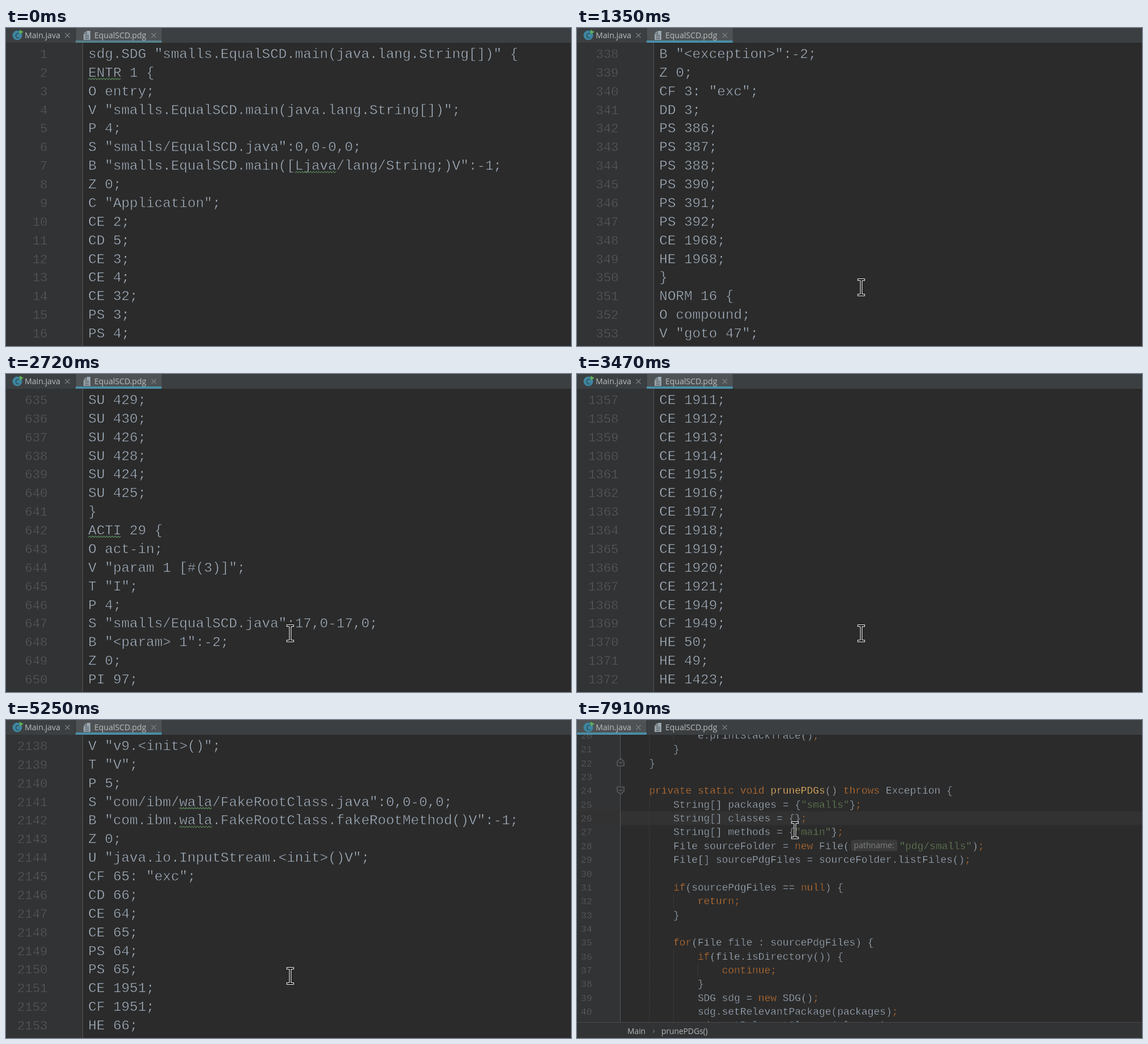
Animation, 998 px wide and 561 px high, one loop 8000 ms. Source, as an HTML page with a canvas:

```html
<!DOCTYPE html>
<html lang="en">
<head>
<meta charset="utf-8">
<title>Editor scrolling</title>
<style>
html, body { margin: 0; width: 100%; height: 100%; overflow: hidden; background: #2b2b2b; }
canvas { display: block; width: 998px; height: 561px; }
</style>
</head>
<body>
<canvas id="stage" width="998" height="561"></canvas>
<script>
const g = document.getElementById('stage').getContext('2d');
const MONO = '"Liberation Mono", "Courier New", monospace';
const UI = '"Open Sans", "Noto Sans", sans-serif';
const PAPER = '#2b2b2b', GUTTER = '#313335';
const LOOP = 8000, SWITCH = 7290, CLICK = 550;

// ---- Graph file: known passages, the rest follows simple block rules
const MAIN = 'smalls.EqualSCD.main([Ljava/lang/String;)V';
const ROOT = `P 5;
S "com/ibm/wala/FakeRootClass.java":0,0-0,0;
B "com.ibm.wala.FakeRootClass.fakeRootMethod()V":-1;
Z 0;`;
const passages = {
  1: `sdg.SDG "smalls.EqualSCD.main(java.lang.String[])" {
ENTR 1 {
O entry;
V "smalls.EqualSCD.main(java.lang.String[])";
P 4;
S "smalls/EqualSCD.java":0,0-0,0;
B "${MAIN}":-1;
Z 0;
C "Application";
CE 2;
CD 5;
CE 3;
CE 4;
CE 32;
PS 3;
PS 4;`,
  338: `B "<exception>":-2;
Z 0;
CF 3: "exc";
DD 3;
PS 386;
PS 387;
PS 388;
PS 390;
PS 391;
PS 392;
CE 1968;
HE 1968;
}
NORM 16 {
O compound;
V "goto 47";`,
  635: `SU 429;
SU 430;
SU 426;
SU 428;
SU 424;
SU 425;
}
ACTI 29 {
O act-in;
V "param 1 [#(3)]";
T "I";
P 4;
S "smalls/EqualSCD.java":17,0-17,0;
B "<param> 1":-2;
Z 0;
PI 97;`,
  1368: `CE 1949;
CF 1949;
HE 50;
HE 49;`,
  1947: `}
NORM 54 {
O compound;
V "field [java.lang.String]";
T "Ljava/lang/String";
${ROOT}
CF 53;
}
NORM 55 {
O compound;
V "index";
T "I";
P 5;`,
  2138: `V "v9.<init>()";
T "V";
${ROOT}
U "java.io.InputStream.<init>()V";
CF 65: "exc";
CD 66;
CE 64;
CE 65;
PS 64;
PS 65;
CE 1951;
CF 1951;
HE 66;`
};
const known = {};
for (const start in passages)
  passages[start].split('\n').forEach((s, i) => known[+start + i] = s);

function graphLine(n) {
  if (known[n]) return known[n];
  if (n > 980 && n < 1368) return `CE ${n + 554};`;
  if (n > 1370 && n < 1640) return `HE ${n + 51};`;
  const early = n < 1000, size = early ? 22 : 11;
  const id = early ? Math.floor(n / size) + 1 : Math.floor((n - 1353) / size);
  const block = [
    `NORM ${id} {`, 'O compound;', `V "v${id} = ${id % 5}";`, 'T "I";',
    ...(early
      ? ['P 4;', 'S "smalls/EqualSCD.java":17,0-17,0;', `B "${MAIN}":${id};`, 'Z 0;']
      : ROOT.split('\n')),
    `CF ${id + 1};`, `DD ${id + 2};`
  ];
  const k = n % size;
  if (k === size - 1) return '}';
  return block[k] || `${k < 15 ? 'PS' : 'SU'} ${370 + id + k};`;
}

// ---- Scroll: [first change, last change, steps], then first line by step
const bursts = [[740, 1460, 8], [1560, 1890, 4], [2030, 2720, 8], [2840, 2930, 2],
  [3070, 3870, 9], [3980, 4720, 8], [4820, 5570, 8]];
const stepTimes = bursts.flatMap(([a, b, n]) =>
  Array.from({ length: n }, (_, i) => a + (b - a) * i / (n - 1)));
const stops = [[0, 1], [7, 338], [20, 635], [21, 690], [22, 1010], [27, 1357],
  [31, 1600], [36, 1947], [39, 1994], [44, 2138], [47, 2200]];

function topLine(t) {
  const step = stepTimes.filter(s => s <= t).length;
  const i = Math.max(1, stops.findIndex(s => s[0] >= step));
  const [a, from] = stops[i - 1], [b, to] = stops[i];
  return Math.round(from + (to - from) * (step - a) / (b - a));
}

// ---- Mouse: [time, shape, x, y]
const mouse = [[0], [100, beam, 746, 537.5], [200, beam, 502, 457.5], [3980, beam, 502, 451.5],
  [5570, beam, 502, 435.5], [5660, beam, 502, 425], [5770, beam, 502, 414.5],
  [6000, beam, 375, 260], [6120, beam, 253, 157.5], [6330, arrow, 38, 58], [6440],
  [6640, arrow, 23, 21], [6750, arrow, 34, 20], [6850, arrow, 42, 19], [6960, arrow, 46, 18],
  [7590, arrow, 56, 21], [7730, beam, 250, 140], [7820, beam, 400, 190], [7910, beam, 385, 194.5]];

// ---- Drawing helpers
function rect(color, x, y, w, h) {
  g.fillStyle = color;
  g.fillRect(x, y, w, h);
}
function text(s, x, y, size, color, font = UI, align = 'left') {
  g.font = `${size}px ${font}`;
  g.textAlign = align;
  g.fillStyle = color;
  g.fillText(s, x, y);
}
// Monospace text, slimmed by an outline in the paper colour
function code(s, x, y, size, color, paper = PAPER, align = 'left') {
  text(s, x, y, size, color, MONO, align);
  g.lineJoin = 'round';
  g.strokeStyle = paper;
  g.lineWidth = size * .026;
  g.strokeText(s, x, y);
  g.lineJoin = 'miter';
}
function trace(points, closed) {
  g.beginPath();
  points.forEach(([x, y]) => g.lineTo(x, y));
  if (closed) g.closePath();
}
function stroke(color, width) {
  g.strokeStyle = color;
  g.lineWidth = width;
  g.stroke();
}
function beam(x, y) {
  g.beginPath();
  for (const s of [-1, 1]) {
    g.moveTo(x - 4.5, y + s * 13.5);
    g.lineTo(x + 4.5, y + s * 13.5);
  }
  g.moveTo(x, y - 13.5);
  g.lineTo(x, y + 13.5);
  g.lineCap = 'square';
  stroke('#fff', 4);
  stroke('#000', 1.8);
  g.lineCap = 'butt';
}
function arrow(x, y) {
  trace([[0, 0], [0, 27], [6, 21.5], [11, 31], [15, 29], [10.5, 20], [19, 19.5]]
    .map(([a, b]) => [x + a, y + b]), true);
  g.fillStyle = '#fff';
  g.fill();
  stroke('#000', 1.3);
}
function squiggle(x, y, w) {
  const points = [];
  for (let i = 0; i * 2.5 <= w; i++) points.push([x + i * 2.5, y + (i % 2 ? -1.3 : 1.3)]);
  trace(points);
  stroke('#5b8a5a', 1.1);
}

function tabs(onMain, focused) {
  rect('#3c3f41', 0, 0, 998, 26);
  const [x, w] = onMain ? [0, 123] : [123, 152];
  rect('#4e5254', x, 0, w, 26);
  rect(focused ? '#4a8da6' : '#56808d', x, 22, w, 4);
  rect('#323537', 122.5, 0, 1, 22);

  g.beginPath();
  g.arc(20, 13, 8.5, 0, 7);
  g.fillStyle = '#3e86a0';
  g.fill();
  text('C', 20, 17.5, 12, '#233942', UI, 'center');
  trace([[24, 3], [31, 7], [24, 11]], true);
  g.fillStyle = '#5fad55';
  g.fill();

  trace([[137, 10], [142, 5], [149, 5], [149, 21], [137, 21]], true);
  g.fillStyle = '#9aa7b0';
  g.fill();
  trace([[137, 10], [142, 10], [142, 5]]);
  stroke('#4e5254', 1.2);
  for (const y of [12, 15, 18]) rect('#4e5254', 139.5, y, 7, 1.2);

  text('Main.java', 33, 18, 14.1, '#bbbdbe');
  text('EqualSCD.pdg', 156, 18, 14.1, '#bbbdbe');
  for (const cx of [108.5, 261]) {
    g.beginPath();
    g.moveTo(cx - 4, 9); g.lineTo(cx + 4, 17);
    g.moveTo(cx + 4, 9); g.lineTo(cx - 4, 17);
    stroke('#7c8082', 1.2);
  }
}

function graphView(t) {
  const left = 145.3, pitch = 14.61, top = topLine(t);
  rect(GUTTER, 0, 26, 135, 535);
  rect('#555759', 135, 26, 1, 535);
  for (let i = 0; i < 16; i++) {
    const s = graphLine(top + i), y = 53 + i * 32.87;
    code(top + i, 73.5, y, 22.4, '#5a5d60', GUTTER, 'right');
    code(s, left, y, pitch / .6, '#a9b7c6');
    for (const m of s.matchAll(/ENTR|ACTI|Ljava|wala/g))
      squiggle(left + m.index * pitch, y + 4, m[0].length * pitch);
  }
  if (t >= CLICK && t < stepTimes[0]) rect('#bbbbbb', left + 6 * pitch, 459, 2, 28);
}

// ---- Java file; "@" stands for the parameter hint
const java = `            e.printStackTrace();
        }
    }

    private static void prunePDGs() throws Exception {
        String[] packages = {"smalls"};
        String[] classes = {};
        String[] methods = {"main"};
        File sourceFolder = new File(@"pdg/smalls");
        File[] sourcePdgFiles = sourceFolder.listFiles();

        if(sourcePdgFiles == null) {
            return;
        }

        for(File file : sourcePdgFiles) {
            if(file.isDirectory()) {
                continue;
            }
            SDG sdg = new SDG();
            sdg.setRelevantPackage(packages);
            sdg.setRelevantClasses(classes);`.split('\n');
const token = /"[^"]*"|\w+|./g;
const keyword = /^(private|static|void|throws|new|null|if|return|for|continue|;)$/;

function tokenColor(s) {
  if (s[0] === '"') return '#6a8759';
  if (s === 'prunePDGs') return '#ffc66d';
  return keyword.test(s) ? '#cc7832' : '#a9b7c6';
}
function foldMark(y, dir) {
  trace([[-6, 6], [6, 6], [6, -2], [0, -7], [-6, -2]].map(([a, b]) => [77 + a, y + b * dir]), true);
  g.fillStyle = GUTTER;
  g.fill();
  stroke('#66696b', 1.2);
  rect('#66696b', 74, y - .5, 6, 1.2);
}
function javaView() {
  const left = 84.5, pitch = 10.72, row = 24.34;
  rect(GUTTER, 0, 26, 76, 507);
  rect('#323232', 0, 161, 998, 24.3);
  rect('#555759', 76, 26, 1, 507);
  let indent = 0;
  java.forEach((s, i) => {
    const mid = 27.1 + i * row, y = mid + 6;
    if (s) indent = s.search(/\S/);
    for (let c = 4; c < indent; c += 4) rect('#3a3a3a', left + c * pitch, mid - row / 2, 1, row);
    code(20 + i, 26.5, y, 16.4, '#606366', GUTTER, 'right');
    let x = left;
    for (const [part] of s.matchAll(token)) {
      if (part === '@') {
        g.beginPath();
        g.roundRect(484, mid - 10.5, 82, 20, 4);
        g.fillStyle = '#3b3b3b';
        g.fill();
        text('pathname:', 489, mid + 4, 14.1, '#7c7f80');
        x += 88;
      } else {
        code(part, x, y, pitch / .6, tokenColor(part));
        x += part.length * pitch;
      }
    }
  });
  foldMark(75, 1);
  foldMark(124, -1);
  rect(GUTTER, 0, 533, 998, 28);
  rect('#46494b', 0, 533, 998, 1);
  text('Main', 89, 554, 13.8, '#b4b7b9');
  text('›', 133.5, 553, 14, '#85888a');
  text('prunePDGs()', 149, 554, 13.8, '#b4b7b9');
}

function draw(now) {
  const t = now % LOOP + 8;
  const onMain = t >= SWITCH;
  rect(PAPER, 0, 0, 998, 561);
  if (onMain) javaView(); else graphView(t);
  tabs(onMain, t >= CLICK);
  const [, shape, x, y] = mouse.filter(m => m[0] <= t).pop();
  if (shape) shape(x, y);
}

let begin;
function tick(now) {
  begin ??= now;
  draw(now - begin);
  requestAnimationFrame(tick);
}
draw(0);
requestAnimationFrame(tick);
</script>
</body>
</html>
```
